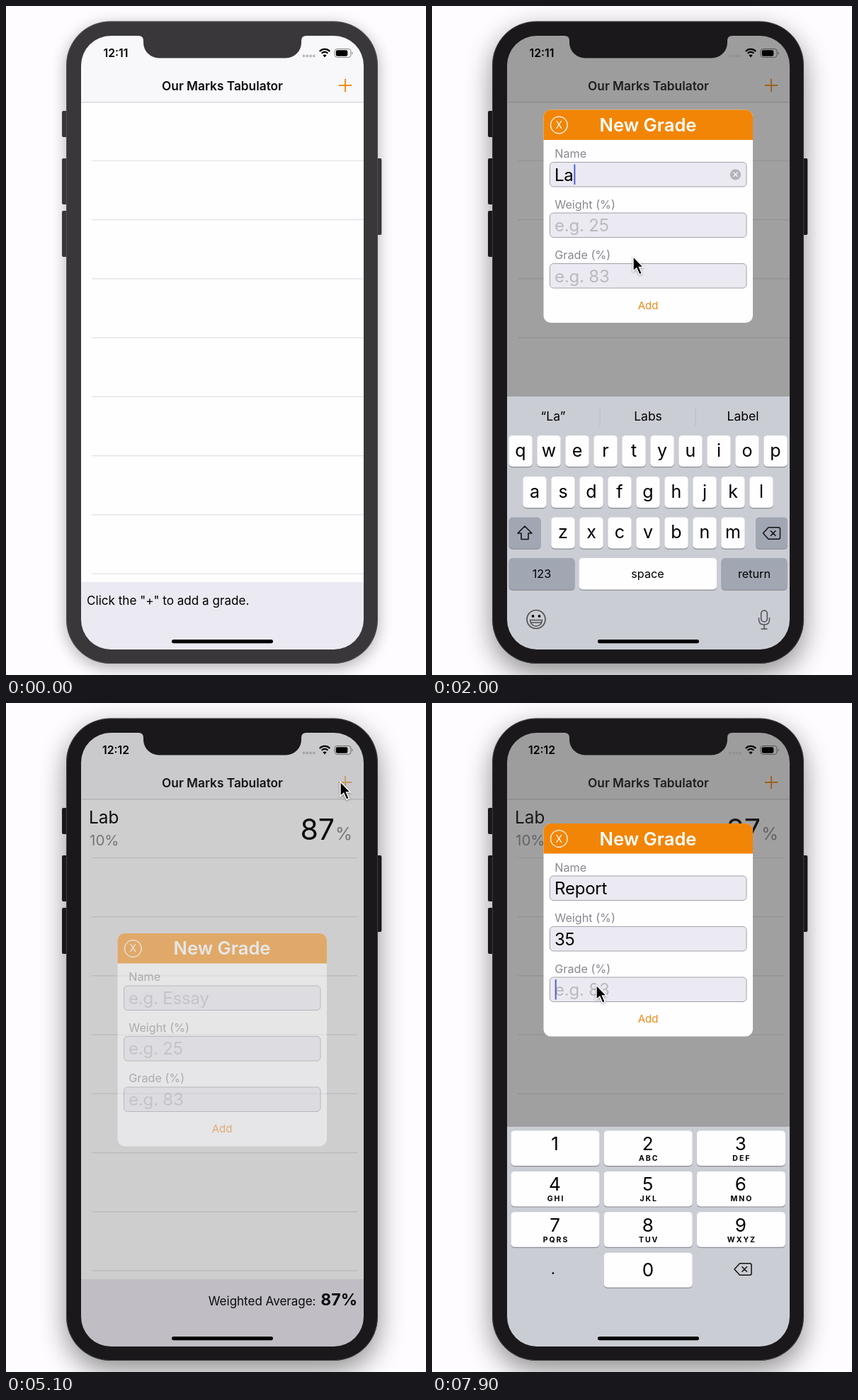
These frames come from a looping animation (593x944 px, 8 s). An HTML page:

```html
<!DOCTYPE html>
<html lang="en">
<head>
<meta charset="utf-8">
<title>Grades</title>
<style>
html, body { margin: 0; width: 100%; height: 100%; overflow: hidden; background: #fefcfe; }
svg { display: block; width: 593px; height: 944px; font-family: Inter, "Open Sans", sans-serif; }
text { white-space: pre; }
</style>
</head>
<body>
<svg id="stage" viewBox="0 0 593 944"></svg>
<script>
const LOOP = 8000, ORANGE = '#f28506', GREY = '#8a888d', WHITE = '#fefdff';
const BOTTOM = 908, QWERTY = 357, DIGITS = 310;

const text = (s, x, y, size, o = '') => `<text x="${x}" y="${y}" font-size="${size}" ${o}>${s}</text>`;
const mid = (s, x, y, size, o = '') => text(s, x, y, size, 'text-anchor="middle" ' + o);
const rect = (x, y, w, h, r, fill, o = '') =>
  `<rect x="${x}" y="${y}" width="${w}" height="${h}" rx="${r}" fill="${fill}" ${o}/>`;
const line = (d, color, w = 1.5, o = '') => `<path d="${d}" fill="none" stroke="${color}" stroke-width="${w}" ${o}/>`;
const times = (n, f) => Array.from({ length: n }, (_, i) => f(i)).join('');

const key = (x, y, w, h, fill = WHITE) =>
  rect(x, y + 1.2, w, h, 5, '#8b8d92') + rect(x, y, w, h, 5, fill);

const backspace = (x, y) =>
  line(`M${x - 12} ${y}l7.5 -8.3h14q2.5 0 2.5 2.5v11.6q0 2.5 -2.5 2.5h-14zM${x - 1.5} ${y - 3.7}l7.4 7.4m0 -7.4l-7.4 7.4`,
    '#111', 1.5, 'stroke-linejoin="round"');

function digitPad() {
  const subs = ['', 'ABC', 'DEF', 'GHI', 'JKL', 'MNO', 'PQRS', 'TUV', 'WXYZ'];
  return times(9, i => {
    const cx = 174 + 131.2 * (i % 3), y = 5.5 + 57.4 * Math.floor(i / 3);
    return key(cx - 62.5, y, 125, 49.5) + mid(i + 1, cx - 0.5, y + 27.5, 26)
      + mid(subs[i], cx + 1, y + 42.3, 10.5, 'font-weight="700" letter-spacing="2"');
  }) + key(242.7, 177.7, 125, 49) + mid('0', 305, 211, 26)
    + mid('.', 171, 208, 22) + backspace(439, 201);
}

function letterPad() {
  const dark = '#a1a6b3';
  const row = (s, x, y) => [...s].map((c, i) =>
    key(x + i * 40 - 16.7, y, 33.4, 44) + mid(c, x + i * 40, y + 29.5, 25)).join('');
  return line('M237 15v27M372 15v27', '#b7b9c1', 1)
    + times(3, i => `<text id="hint${i}" x="${171 + 134 * i}" y="34" font-size="17.5" text-anchor="middle"/>`)
    + row('qwertyuiop', 125, 55) + row('asdfghjkl', 145, 113) + row('zxcvbnm', 185, 170.5)
    + key(108.5, 170.5, 45, 44, dark)
    + line('M131 183l10 10h-5v8.500h-10v-8.500h-5z', '#111', 1.6, 'stroke-linejoin="round"')
    + key(457, 170.5, 45, 44, dark) + backspace(479.500, 193)
    + key(108.5, 228, 93, 44.500, dark) + mid('123', 155, 256, 16.200)
    + key(207.5, 228, 194.500, 44.500) + mid('space', 304.500, 255.500, 16.200)
    + key(408.5, 228, 93, 44.500, dark) + mid('return', 455, 255.500, 16.200)
    + `<circle cx="147" cy="314.500" r="13" fill="none" stroke="#505157" stroke-width="1.700"/>
       <circle cx="142.500" cy="310" r="1.900"/><circle cx="151.500" cy="310" r="1.900"/>`
    + line('M138.500 315.500h17q-1 8.500 -8.500 8.500t-8.500 -8.500zM139.500 319h15', '#505157')
    + rect(464.700, 302, 8.600, 16, 4.300, 'none', 'stroke="#505157" stroke-width="1.600"')
    + line('M461.500 312v3q0 7 7.500 7t7.500 -7v-3M469 322v5.500M464.500 328h9', '#505157');
}

function card() {
  const labels = ['Name', 'Weight (%)', 'Grade (%)'];
  return rect(157.5, 0, 295.5, 300.5, 10, WHITE)
    + `<path d="M157.500 42.500V10a10 10 0 0 1 10 -10h275.500a10 10 0 0 1 10 10v32.500z" fill="${ORANGE}"/>`
    + '<circle cx="179.300" cy="21.500" r="11.800" fill="none" stroke="#fff" stroke-width="1.300"/>'
    + mid('X', 179.300, 26.500, 14, 'fill="#fff"')
    + mid('New Grade', 305, 30.500, 25.600, 'fill="#fff" font-weight="600"')
    + times(3, i => {
      const y = 71.5 * i;
      return text(labels[i], 173.300, y + 67.500, 16.200, `fill="${GREY}"`)
        + rect(166.5, y + 74, 277.5, 34.500, 5, '#ebe9f1', 'stroke="#a3a1a6"')
        + text('', 173, y + 100, 24, `id="field${i}" letter-spacing="-.2"`)
        + `<g id="clear${i}"><circle cx="428.500" cy="${y + 91.300}" r="7.600" fill="#b4b2b8"/>`
        + line(`M425.500 ${y + 88.300}l6 6m0 -6l-6 6`, '#f2f0f6') + '</g>';
    })
    + rect(173.700, 77, 2, 28.500, 0, '#4a62d8', 'id="caret"')
    + mid('Add', 305, 281.300, 15, 'id="add" fill="#ee8d18"');
}

function list() {
  return rect(105, 41, 401, 868, 0, WHITE)
    + rect(105, 41, 401, 94.500, 0, '#f8f7f9') + line('M105 135.800H506', '#d3d1d5', 1.200)
    + mid('Our Marks Tabulator', 305.500, 118.500, 17.300, 'font-weight="600" fill="#0c0c0e"')
    + line('M469.800 112h18.400M479 102.800v18.400', '#f18b12', 1.900, 'id="plus"')
    + '<path id="rules" stroke="#e2e0e4" stroke-width="1.200"/>'
    + rect(105, 813, 401, 96, 0, '#ebe9f1')
    + text('Click the "+" to add a grade.', 114, 845, 17.100, 'id="tip"')
    + '<g id="result">'
    + text('Lab', 117, 170, 24.300) + text('10%', 118, 201, 20.600, `fill="${GREY}"`)
    + text('87', 464, 193, 41, 'text-anchor="end"')
    + text('%', 489, 193, 24.500, `text-anchor="end" fill="${GREY}"`)
    + text('Weighted Average:', 437.500, 850, 17, 'text-anchor="end"')
    + text('87%', 496, 850, 23, 'text-anchor="end" font-weight="700"') + '</g>';
}

function statusBar() {
  const arc = r => line(`M${450 - r * .72} ${71 - r * .7}a${r} ${r} 0 0 1 ${r * 1.440} 0`, '#000', 2.300);
  return mid('', 155, 72, 15.800, 'id="clock" font-weight="600"')
    + times(4, i => `<circle cx="${420.500 + 4.800 * i}" cy="70.500" r="1.900" fill="#88868a" opacity=".55"/>`)
    + arc(10) + arc(6) + '<path d="M450 72.500l-2.600 -3q2.600 -2 5.200 0z"/>'
    + rect(464, 60.500, 23, 12, 3.500, 'none', 'stroke="#000" stroke-opacity=".45"')
    + rect(465.800, 62.300, 16.500, 8.400, 2, '#000')
    + '<path d="M488.500 64.500q2.400 2 0 4z" opacity=".5"/>';
}

const shadow = (id, dy, blur, alpha) =>
  rect(85, 21 + dy, 440, 907, 62, '#000', `id="${id}" opacity="${alpha}" style="filter:blur(${blur}px)"`);

function phone() {
  const side = [[79, 148, 37], [79, 215, 65], [79, 289, 65], [522, 215, 108]];
  return '<g id="body">'
    + side.map(([x, y, h]) => rect(x, y, 8.300, h, 2, 'inherit')).join('').replaceAll('fill="inherit"', '')
    + `<path fill-rule="evenodd" d="M147 21.500H463a62 62 0 0 1 62 62V866a62 62 0 0 1 -62 62H147a62 62 0 0 1 -62 -62V83.500a62 62 0 0 1 62 -62z
        M148 42a42 42 0 0 0 -42 42V866a42 42 0 0 0 42 42H463a42 42 0 0 0 42 -42V84a42 42 0 0 0 -42 -42H424q-7 0 -7 7v2.500a22 22 0 0 1 -22 22H216a22 22 0 0 1 -22 -22v-2.500q0 -7 -7 -7z"/></g>`
    + rect(85.500, 22, 439, 905.500, 61.500, 'none', 'stroke="#777" stroke-opacity=".4"');
}

stage.innerHTML = `<defs><clipPath id="screen">${rect(105.500, 41.500, 400, 867, 43, '#000')}</clipPath></defs>`
  + shadow('dimShadow', 6, 11, .3) + shadow('deepShadow', 14, 19, .44)
  + `<g clip-path="url(#screen)">${list()}${rect(105, 41, 401, 868, 0, '#333', 'id="veil"')}
     <g id="card">${card()}</g>
     <g id="keys">${rect(105, 0, 401, 400, 0, '#cbcdd4')}<g id="letters">${letterPad()}</g><g id="digits">${digitPad()}</g></g>
     ${statusBar()}</g>`
  + phone() + rect(234, 894, 143, 5.200, 2.600, '#000')
  + `<path id="mouse" d="M0 0V20.500L4.800 16.200L8.700 25.200L12.300 23.700L8.500 14.900H14.500Z" stroke="#fff" stroke-width="1.400"
      style="filter:drop-shadow(0 1.500px 1.500px rgba(0,0,0,.35))"/>`;

const $ = id => document.getElementById(id);
const set = (id, o) => { for (const k in o) $(id).setAttribute(k, o[k]); };
const show = (id, on) => set(id, { display: on ? 'inline' : 'none' });
const clamp = v => Math.max(0, Math.min(1, v));
const ease = v => { v = clamp(v); return v * v * (3 - 2 * v); };
const spring = ms => ms <= 0 ? 0 : 1 - (1 + ms * .018) * Math.exp(-ms * .018);

// Each visit: popup opens, three fields are focused and typed into.
const visits = [
  { open: 833, focus: [1223, 2330, 3030], close: 4380,
    words: [['Lab', 1720, 150], ['10', 2580, 160], ['87', 3220, 180]], hints: ['Labs', 'Label'] },
  { open: 4950, focus: [5340, 6170, 7550], close: 1e5,
    words: [['Report', 5650, 80], ['35', 6700, 200], ['', 1e5, 1]], hints: ['Reports', 'Reported'] }
];
const placeholders = ['e.g. Essay', 'e.g. 25', 'e.g. 83'];

// Time, x, y of the pointer tip.
const path = [
  [400, 500, 150], [650, 472, 111], [930, 472, 111], [1300, 284, 406], [1750, 284, 406], [2230, 284, 308],
  [2500, 284, 308], [2800, 271, 396], [3850, 271, 396], [4180, 300, 449], [4430, 300, 449], [4750, 538, 100],
  [4900, 472, 111], [5150, 472, 111], [5560, 271, 419], [5750, 271, 419], [6100, 240, 310], [7000, 240, 310],
  [7380, 232, 398], [LOOP, 232, 398]
];

function pointer(t) {
  const i = Math.max(1, path.findIndex(p => p[0] > t));
  const [a, b] = [path[i - 1], path[i]], k = ease((t - a[0]) / (b[0] - a[0]));
  return [1, 2].map(n => a[n] + (b[n] - a[n]) * k);
}

function drawFields(t, v) {
  const active = t < v.close ? v.focus.filter(f => t >= f).length - 1 : -1;
  let name = '';
  show('caret', false);
  v.words.forEach(([word, start, step], i) => {
    const n = Math.max(0, Math.min(word.length, Math.floor((t - start) / step) + 1));
    const typed = word.slice(0, n), el = $('field' + i);
    el.textContent = typed || placeholders[i];
    set('field' + i, { fill: typed ? '#000' : '#bbb9bf' });
    show('clear' + i, typed && i === active);
    if (i === 0) name = typed;
    if (i !== active) return;
    const since = t - (n ? start + (n - 1) * step : v.focus[i]);
    show('caret', since % 1000 < 500);
    set('caret', { x: 173.700 + (n ? el.getComputedTextLength() : 0), y: 77 + 71.5 * i });
  });
  const hints = name ? ['“' + name + '”', ...v.hints] : ['I', 'the', 'I’m'];
  hints.forEach((h, i) => { $('hint' + i).textContent = h; });
}

function draw(t) {
  const v = visits[t < 4800 ? 0 : 1], awake = t >= 400, added = t >= v.close || v === visits[1];
  const height = visits.reduce((h, { focus: [a, b], close }) => h + QWERTY * spring(t - a)
    - (QWERTY - DIGITS) * spring(t - b) - DIGITS * spring(t - close), 0);
  const fade = ease((t - v.open) / 300) * (1 - ease((t - v.close) / 300));

  set('body', { fill: awake ? '#1a181b' : '#39373a' });
  show('dimShadow', !awake);
  show('deepShadow', awake);

  set('rules', { d: times(8, i => `M121 ${218.500 + 83.220 * i}H${added ? 496 : 506}`) });
  show('tip', !added);
  show('result', added);
  $('clock').textContent = t < 4500 ? '12:11' : '12:12';
  const press = t - v.open + 60;
  set('plus', { opacity: press < 0 ? 1 : .3 + .7 * ease((press - 130) / 200) });

  set('veil', { opacity: .46 * fade });
  set('card', { opacity: fade, transform: `translate(0 ${325 - height / 2})` });
  set('add', { opacity: t > 4230 && t < 4400 ? .2 : 1 });
  set('keys', { transform: `translate(0 ${BOTTOM - height})` });
  show('keys', height > .5);
  const numeric = t >= v.focus[1];
  show('digits', numeric);
  show('letters', !numeric);
  drawFields(t, v);

  show('mouse', awake);
  set('mouse', { transform: `translate(${pointer(t)})` });
}

const begin = performance.now();
function tick() {
  draw((performance.now() - begin) % LOOP);
  requestAnimationFrame(tick);
}
tick();
</script>
</body>
</html>
```
